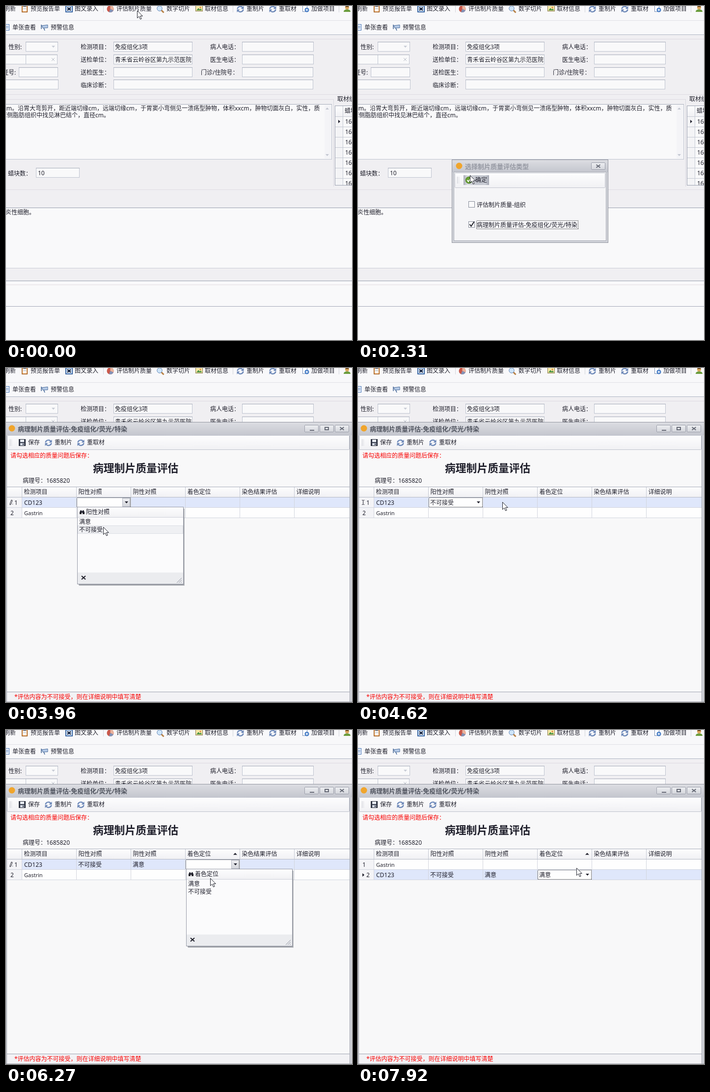
Recreate the animation shown at these times as an HTML page. Size 705 by 681 pixels, loop 8 s.

```html
<!DOCTYPE html>
<html lang="zh-CN">
<head>
<meta charset="utf-8">
<title>病理制片质量评估</title>
<style>
html, body { margin: 0; width: 100%; height: 100%; overflow: hidden; background: #f8f8f9; }
svg { display: block; width: 705px; height: 681px; font: 12px 'Noto Sans', 'Noto Sans CJK SC', 'Noto Sans CJK', sans-serif; }
rect, line { shape-rendering: crispEdges; }
text { white-space: pre; }
</style>
</head>
<body>
<svg viewBox="0 0 705 681">
  <defs>
    <linearGradient id="bar" x2="0" y2="1"><stop stop-color="#fdfdfe"/><stop offset="1" stop-color="#f1f1f4"/></linearGradient>
    <linearGradient id="cap" x2="0" y2="1"><stop stop-color="#dcdde2"/><stop offset="1" stop-color="#c4c6ce"/></linearGradient>
    <linearGradient id="btn" x2="0" y2="1"><stop stop-color="#eeeff2"/><stop offset="1" stop-color="#d3d5db"/></linearGradient>
    <linearGradient id="hot"><stop stop-color="#a9acb6"/><stop offset=".15" stop-color="#dcdee3"/><stop offset=".5" stop-color="#c3c6ce"/><stop offset=".85" stop-color="#c9ccd4"/><stop offset="1" stop-color="#a3a6b1"/></linearGradient>
  </defs>
  <g id="page"></g><g id="front"></g><g id="cursor"></g>
</svg>
<script>
const INK = '#1f1f2b', EDGE = '#a9aebb', RED = '#f80000', ROW = '#dfe7fb';
const $ = id => document.getElementById(id);

// Text is placed by its left edge and the vertical centre of its line.
const text = (x, c, s, fill = INK, size = 12, weight = 400) =>
  `<text x="${x}" y="${c + size * .37}" fill="${fill}" font-size="${size}" font-weight="${weight}">${s}</text>`;
const fill = (x, y, w, h, color, extra = '') =>
  `<rect x="${x}" y="${y}" width="${w}" height="${h}" fill="${color}" ${extra}/>`;
const box = (x, y, w, h, color, edge = EDGE, extra = '') =>
  `<rect x="${x + .5}" y="${y + .5}" width="${w - 1}" height="${h - 1}" fill="${color}" stroke="${edge}" ${extra}/>`;
const hLine = (y, color, x = 0, w = 705) => fill(x, y, w, 1, color);
const vLine = (x, y, h, color) => fill(x, y, 1, h, color);
const path = (d, color = 'none', stroke = 'none', width = 1) =>
  `<path d="${d}" fill="${color}" stroke="${stroke}" stroke-width="${width}"/>`;
const circle = (x, y, r, color, stroke = 'none') =>
  `<circle cx="${x}" cy="${y}" r="${r}" fill="${color}" stroke="${stroke}"/>`;
const at = (x, y, s) => `<g transform="translate(${x} ${y})">${s}</g>`;
const dotted = (x, y, w, h, color = 'none') => box(x, y, w, h, color, '#222', 'stroke-dasharray="1 1"');
const downArrow = (x, y, color = INK) => path(`M${x - 4} ${y - 2}h7l-3.5 4z`, color);
const grip = (x, y, h) => vLine(x, y, h, '#c9cbd2') + vLine(x + 3, y, h, '#dcdde2');

const icons = {
  refresh: path('M1.5 7A6 5.5 0 0 1 12 4M13.5 8A6 5.5 0 0 1 3 11', 'none', '#6d88b8', 2.4) +
    path('M14.5 1v6h-6zM.5 14V8h6z', '#6d88b8') + path('M3 6.5A4.5 4 0 0 1 9 3.5', 'none', '#c8d6ee'),
  save: box(0, 0, 14, 14, '#343a4a', '#252a36') + fill(3, 1, 8, 5, '#e9edf5') + fill(3, 8, 8, 5, '#cfd5e1') + fill(8, 9, 2, 3, '#343a4a'),
  clip: box(0, 0, 12, 14, '#d98b3c', '#9c5a20') + fill(2, 2, 8, 10, '#fff') + fill(3, 0, 6, 3, '#777d8b') + fill(3, 6, 6, 1, '#9ab'),
  record: box(0, 0, 15, 14, '#4d7fc0', '#2b5591') + fill(2, 2, 11, 10, '#e6f0fb') + path('M4 4l7 6M11 4l-7 6', 'none', '#1d2a45', 2.5),
  pie: circle(7.5, 7, 7, '#c9584b') + path('M7.5 7V0A7 7 0 0 1 14 10z', '#e9b39d') + path('M7.5 7L14 10A7 7 0 0 1 5 13.5z', '#8293b8'),
  lens: path('M9.5 9.5l5 5', 'none', '#b78145', 3) + circle(6, 6, 5.2, '#cfe5f8', '#6487b8'),
  photo: box(0, 0, 15, 12, '#f7e9a8', '#8b7a4c') + path('M2 10l4-5 3 3 2-2 2 4z', '#4c9446') + circle(10, 4, 1.5, '#e27b36'),
  add: box(0, 0, 10, 13, '#fff', '#7b91b5') + circle(9, 9, 4.5, '#4179c4') + path('M6.5 9h5M9 6.5v5', 'none', '#fff', 1.5),
  user: path('M0 13q0-5 7-5t7 5z', '#6b9c3d') + circle(7, 4, 4, '#d9a45b') + path('M3 3q4-6 8 0z', '#6c4a24'),
  sheet: box(0, 0, 11, 13, '#eef4fd', '#4b78b8') + fill(2, 4, 7, 1, '#4b78b8') + fill(2, 7, 7, 1, '#4b78b8'),
  horn: path('M2 3L14 1.5v6L4 8z', '#b4c9e6', '#4c6d9c') + path('M1 1v9M6 8l2 5', 'none', '#4c6d9c', 1.6),
  ok: circle(7, 7, 6.8, '#67a032', '#4b7c22') + path('M3.5 7l2.5 3 4.5-6', 'none', '#fff', 2),
  find: path('M0 9V5l2-4h2v8zM6 9V1h2l2 4v4z', INK) + fill(4, 3, 2, 3, INK),
  pencil: path('M1 8L4 0l2 1-3 8-2 1z', '#fff', INK) + fill(6, 8, 1, 1, INK),
  beam: path('M0 .5h2M3 .5h2M2.5 1v8M0 9.5h2M3 9.5h2', 'none', INK),
  arrow: path('M0 0v7l4-3.5z', INK),
  filter: path('M0 .5h7L4.5 3v4h-2V3z', '#fff', '#777b88', .8)
};
const icon = (name, x, y) => at(x, y, icons[name]);

// Fields have a darker top edge.
const field = (x, y, w, h) => box(x, y, w, h, '#f9f9fa', '#bfc4d0') + hLine(y, '#a6acba', x, w);
const input = (x, y, w, value = '') => field(x, y, w, 20) + (value && text(x + 3, y + 11, value));

function drawPage() {
  let s = fill(0, 0, 705, 681, '#f0eff2') + fill(0, 0, 705, 58, '#f8f8fa') +
    hLine(29, '#dfe0e5') + hLine(58, '#aeb4c3') + hLine(67, '#ddd9e2');
  const tools = [['clip', 32, '预览报告单', 50], ['record', 121, '图文录入', 140], ['lens', 307, '数字切片', 327],
    ['photo', 386, '取材信息', 405], ['refresh', 470, '重制片', 490], ['refresh', 536, '重取材', 556], ['add', 604, '加做项目', 622]];
  s += text(-4, 6, '刷新') + tools.map(([i, x, t, tx]) => icon(i, x, -1) + text(tx, 6, t)).join('') + icon('user', 688, -1);
  s += [198, 462, 678].map(x => vLine(x, 0, 13, '#d2d4db')).join('');
  s += icon('sheet', -4, 37) + text(13, 44, '单张查看') + icon('horn', 71, 37) + text(91, 44, '预警信息');

  s += text(5, 84, '性别:') + input(40, 73, 66) + downArrow(97, 83, '#c8ccd5') +
    input(-2, 99, 43) + input(40, 99, 65) + path('M93 106l6 6M99 106l-6 6', 'none', '#b5bac5') +
    text(-7, 136, '证号:') + input(26, 125, 80) + input(-2, 150, 109);
  ['检测项目：', '送检单位：', '送检医生：', '临床诊断：'].forEach((t, i) => s += text(152, 84 + 26 * i, t));
  s += input(219, 73, 161, '免疫组化3项') + input(219, 99, 161, '青禾省云岭谷区第九示范医院') + input(219, 125, 161) + input(219, 150, 407);
  s += text(416, 84, '病人电话：') + text(416, 110, '医生电话：') + text(397, 136, '门诊/住院号：') +
    input(481, 73, 146) + input(481, 99, 146) + input(481, 125, 145);

  s += hLine(180, '#dedbe2') + hLine(190, '#dddae2', 0, 667) + vLine(667, 190, 178, '#d8d8df');
  s += field(-2, 200, 666, 113) + fill(649, 202, 13, 109, '#f4f4f7') +
    path('M651 211h7l-3.5-4z', '#c2c6d0') + downArrow(655, 304, '#c2c6d0');
  s += text(-5, 209, 'cm。沿胃大弯剪开，距近端切缘cm，远端切缘cm，于胃窦小弯侧见一溃疡型肿物，体积xxcm，肿物切面灰白，实性，质') +
    text(-10, 223, '弯侧脂肪组织中找见淋巴结个，直径cm。');
  s += text(4, 342, '蜡块数：') + input(61, 330, 89) + text(65, 341, '10');

  s += text(675, 190, '取材组织') + box(670, 203, 40, 163, '#f9f9fa', '#9da3b2') + fill(671, 204, 34, 21, 'url(#bar)') +
    fill(671, 225, 15, 140, '#f4f4f6') + vLine(686, 204, 161, '#c5c9d3') + text(690, 214, '蜡块');
  for (let y = 225; y < 360; y += 21) s += hLine(y, '#c5c9d3', 671, 34) + text(691, y + 11, '16');
  s += fill(670, 366, 35, 8, '#f0eff2') + hLine(365, '#9da3b2', 670, 35) + icon('arrow', 677, 232);

  return s + hLine(374, '#dedbe2') + fill(0, 411, 705, 124, '#f9f9fa') + hLine(411, '#999fae') + text(-1, 421, '炎性细胞。') +
    hLine(534, '#c9ccd5') + fill(0, 560, 705, 121, '#f9f9fa') + hLine(560, '#999fae') + hLine(568, '#e2dce1') + hLine(612, '#a4a9b7');
}

const rateButton = hot => (hot ? box(201, -4, 100, 22, 'url(#hot)', '#a5a8b3') : '') + icon('pie', 205, -1) + text(225, 6, '评估制片质量');
const capButton = (x, y, mark) => box(x, y, 29, 15, 'url(#btn)', '#9b9eaa', 'rx="2"') + at(x + 14.5, y + 7.5, mark);
const MARK = '#666a76';
const CLOSE = path('M-4-3l8 6M4-3l-8 6', 'none', MARK, 2);
const logo = (x, y) => circle(x, y, 6.5, '#f0a52c');

function typeDialog({ checked, okHot = 0, gray, hoverFirst }) {
  const check = (y, hot) => box(225, y, 13, 13, hot ? '#e4ecf8' : '#fafafb', hot ? '#6f8fbd' : '#878c99');
  return box(191, 313, 319, 170, '#d2d4da', '#92959f') + fill(192, 314, 317, 25, 'url(#cap)') +
    logo(206, 326) + text(218, 327, '选择制片质量评估类型', gray ? '#9699a3' : '#4e525e', 13, 700) + capButton(475, 319, CLOSE) +
    box(195, 338, 311, 141, '#f5f5f7', '#a5a8b2') + box(197, 340, 307, 31, 'url(#bar)', '#c1c4cd', 'rx="2"') + grip(202, 348, 14) +
    `<g opacity="${okHot}">${fill(215, 345, 52, 20, 'url(#hot)')}</g>` + icon('ok', 219, 348) + text(239, 355, '确定') +
    check(398, hoverFirst) + text(242, 406, '评估制片质量-组织') + check(439) + text(242, 447, '病理制片质量评估-免疫组化/荧光/特染') +
    (checked ? path('M227.5 445l3 4 6-9', 'none', '#20222a', 2) + dotted(241, 437, 208, 18) : '');
}

const COLS = [2, 32, 143, 254, 365, 476, 587, 699];
const HEADS = ['', '检测项目', '阳性对照', '阴性对照', '着色定位', '染色结果评估', '详细说明'];

function sheet() {
  let s = fill(0, 110, 705, 571, '#d0d2d8') + fill(0, 111, 705, 26, 'url(#cap)') + hLine(110, '#92959f') +
    logo(12, 123) + text(24, 124, '病理制片质量评估-免疫组化/荧光/特染', '#50545f', 13, 700) +
    capButton(608, 116, fill(-4, 2, 9, 2, MARK)) +
    capButton(639, 116, fill(-3.5, -2.5, 7, 5, 'none', `stroke="${MARK}" stroke-width="2"`)) + capButton(670, 116, CLOSE);
  s += fill(2, 137, 698, 543, '#f8f8f9') + vLine(1, 137, 543, '#a5a8b2') + vLine(700, 137, 543, '#a5a8b2') +
    box(2, 137, 698, 30, 'url(#bar)', '#bfc3cd', 'rx="2"') + grip(8, 145, 14) + icon('save', 26, 145) + text(45, 152, '保存') +
    icon('refresh', 79, 145) + text(99, 152, '重制片') + icon('refresh', 145, 145) + text(165, 152, '重取材');
  s += text(9, 179, '请勾选相应的质量问题后保存：', RED) + text(177, 204, '病理制片质量评估', INK, 21.8, 700) + text(34, 230, '病理号：1685820');
  s += fill(2, 242, 698, 21, 'url(#bar)') + hLine(242, '#a9aebb', 2, 698) + hLine(263, '#b5bac6', 2, 698);
  HEADS.forEach((h, i) => s += text(COLS[i] + 4.5, 253, h) + (i ? vLine(COLS[i], 243, 20, '#c5c9d3') : ''));
  return s + hLine(660, '#9ea3b0', 2, 698) + fill(2, 661, 698, 19, '#f2f2f5') +
    text(17, 671, '*评估内容为不可接受，则在详细说明中填写清楚', RED) + hLine(680, '#a5a8b2');
}

function gridRow(n, name, values, active, s) {
  const y = 264 + 21 * n, c = y + 10.5;
  let out = fill(2, y, 698, 21, active ? ROW : '#fefefe') + fill(2, y, 30, 21, '#f4f4f7') + text(active ? 17 : 9, c, n + 1);
  if (active) out += icon(s.mark, s.mark == 'arrow' ? 9 : s.mark == 'beam' ? 8 : 7, y + (s.mark == 'arrow' ? 7 : 5));
  out += COLS.slice(1, 7).map(x => vLine(x, y, 21, '#d2d5de')).join('') + hLine(y + 20, '#d2d5de', 2, 698);
  if (active) {
    const x = COLS[s.focus] + 1;
    out += dotted(x, y, 110, 20, '#fefefe');
    if (s.editor) {
      if (s.popup) out += box(x + 93, y + 1, 16, 18, 'url(#btn)', '#b5b9c4');
      out += downArrow(x + 102, y + 10);
    }
  }
  out += text(37, c, name, INK, name == 'Gastrin' ? 11 : 12);
  values.forEach((v, i) => out += text(COLS[i + 2] + 4, c + .5, v));
  return out;
}

function popup(col, hover) {
  const item = (i, t) => (hover == i ? box(1, 22 + 16 * i, 215, 17, '#eff0f3', '#dcdee4') : '') + text(4, 31 + 16 * i, t);
  return at(COLS[col] + 2, 283,
    fill(4, 4, 215, 157, '#6e727d', 'opacity=".35"') + fill(3, 3, 215, 157, '#6e727d', 'opacity=".5"') +
    box(0, 0, 217, 158, '#fbfbfc', '#989ca8') + fill(1, 1, 215, 20, 'url(#bar)') + hLine(21, '#cfd2da', 1, 215) +
    icon('find', 5, 6) + text(18, 11, HEADS[col]) + item(0, '满意') + item(1, '不可接受') +
    fill(1, 134, 215, 23, '#ebecef') + path('M9 141l8 7M17 141l-8 7', 'none', INK, 2) +
    path('M203 155l10-10M207 155l6-6M211 155l2-2', 'none', '#8c909c'));
}

function grid(s) {
  const main = ['CD123', s.values, true], other = ['Gastrin', [], false];
  const rows = s.swapped ? [other, main] : [main, other];
  return rows.map((r, n) => gridRow(n, ...r, s)).join('') +
    (s.sorted ? path('M463 254.5h8l-4-4z', INK) : '') + (s.filter ? icon('filter', 466, 246) : '') +
    (s.popup ? popup(s.focus, s.hover) : '');
}

// Each step keeps what came before and changes only what it names.
const STEP = 330, LOOP = 8000;
const changes = [
  { cur: [267, 9] },
  { cur: [262, 9], rateHot: true },
  { cur: [347, 255], rateHot: false, view: 'type' },
  { cur: [226, 420], hoverFirst: true },
  { cur: [322, 443], hoverFirst: false },
  { cur: [240, 420], checked: true, okHot: .4 },
  { cur: [228, 345], okHot: 1 },
  { gray: true },
  { cur: [188, 310], view: 'sheet', focus: 1, mark: 'arrow', values: [] },
  { cur: [169, 276] },
  { cur: [170, 273] },
  { focus: 2, editor: true, popup: true, mark: 'pencil' },
  { cur: [198, 324], hover: 1 },
  { cur: [222, 307], popup: false, hover: -1, mark: 'beam', values: ['不可接受'] },
  { cur: [294, 273] },
  { cur: [296, 307], focus: 3, popup: true, hover: 0 },
  { cur: [296, 309] },
  { cur: [412, 262], popup: false, hover: -1, values: ['不可接受', '满意'], filter: true },
  { cur: [414, 280], filter: false, sorted: true, mark: 'arrow', editor: false },
  { cur: [416, 302], focus: 4, editor: true, popup: true, mark: 'pencil' },
  { cur: [418, 313], hover: 0 },
  { cur: [441, 303], popup: false, hover: -1, mark: 'beam', values: ['不可接受', '满意', '满意'] },
  { swapped: true, mark: 'arrow' },
  { cur: [444, 292] },
  { cur: [445, 281] }
];
let last = {};
const states = changes.map(c => last = { ...last, ...c });

$('page').innerHTML = drawPage();
$('cursor').innerHTML = path('M.5.5v15l3.6-3.3L6.6 18l2.5-1-2.5-5.5h4.7z', '#fff', '#20222c');
const sheetBase = sheet();
let shown = -1;

function show(n) {
  const s = states[n];
  $('front').innerHTML = rateButton(s.rateHot) +
    (s.view == 'type' ? typeDialog(s) : s.view == 'sheet' ? sheetBase + grid(s) : '');
  $('cursor').setAttribute('transform', `translate(${s.cur})`);
}

const start = performance.now();
function tick() {
  const n = Math.floor((performance.now() - start) % LOOP / STEP);
  if (n != shown) show(shown = n);
  requestAnimationFrame(tick);
}
tick();
</script>
</body>
</html>
```
